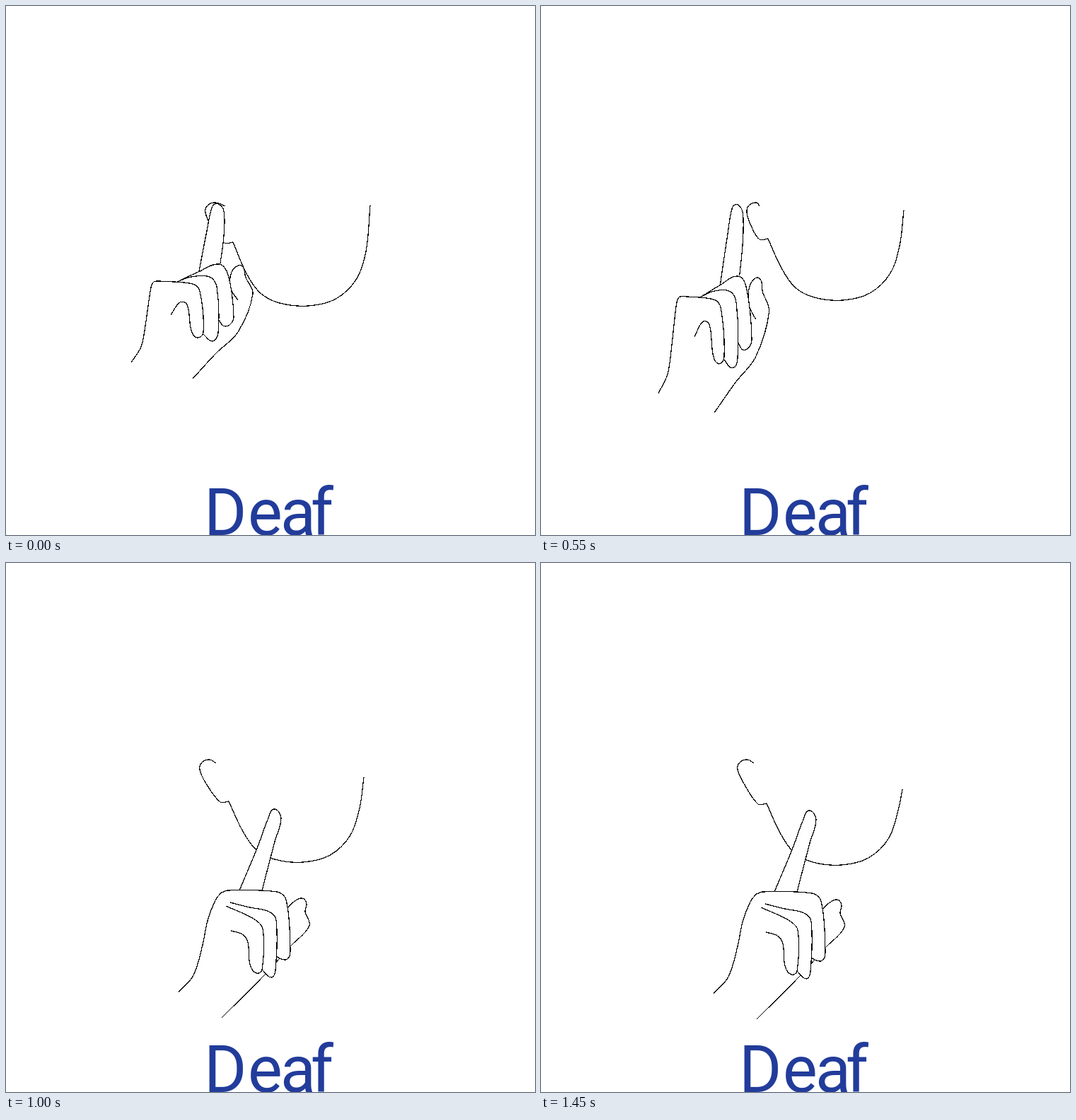
These frames come from a looping animation (748x748 px, 1500 ms). An HTML page:

```html
<!DOCTYPE html>
<html lang="en">
<head>
<meta charset="utf-8">
<title>Deaf</title>
<style>
  html, body { margin: 0; width: 100%; height: 100%; overflow: hidden; background: #fff; }
  svg { display: block; width: 100vw; height: 100vh; }
  path { fill: none; stroke: #000; stroke-width: 1.25; shape-rendering: crispEdges; }
  path.solid { fill: #fff; }
  text { font: 400 92px Roboto, Lato, sans-serif; fill: #223c9b; }
</style>
</head>
<body>
<svg viewBox="0 0 748 748">
  <g id="lines"></g>
  <text x="280 342 388 431" y="748">Deaf</text>
</svg>
<script>
const LOOP = 1500, STEP = 50;

// Hand lines: [shape at the ear, shape at the mouth, filled].
const HAND = {
  thumb: ['328,416 318,400 319,376 333,367 339,384 349,407 328,461 297,491 264,527',
          '398,490 407,481 419,476 425,484 423,495 429,515 402,544 365,585 305,645', true],
  index: ['273,375 284,318 292,283 300,280 308,290 308,325 303,364',
          '330,465 356,403 370,365 379,350 389,363 380,396 362,465', true],
  middle: ['242,390 272,376 301,365 314,380 322,440 316,451 307,452 301,444',
           '303,469 313,465 383,467 396,478 402,550 398,562 389,562 381,557', true],
  ring: ['242,390 262,383 288,383 298,397 300,462 292,474 279,464',
         '317,482 345,489 372,495 382,507 381,578 375,588 362,577', true],
  pinky: ['217,389 264,393 274,403 279,462 270,469 262,459 256,422 246,419 233,437',
          '311,487 350,505 363,519 362,577 354,582 345,570 342,538 334,527 318,522', true],
  arm: ['177,504 191,482 197,452 205,398 209,390 218,389',
        '244,609 265,585 278,542 285,508 296,479 305,467', false]
};

// time, shift x, shift y, scale x, scale y, morph from ear to mouth
const HAND_KEYS = [
  [0, 0, 0, 1, 1, 0],
  [200, -28, -4, 0.97, 1.04, 0],
  [350, -23, -1, 0.95, 1.08, 0],
  [550, -22, 18, 0.91, 1.19, 0],
  [800, -27, -22, 1, 1, 1],
  [1000, 0, -2, 1, 1, 1],
  [1450, 0, 0, 1, 1, 1]
];
const PIVOT = [300, 370];

// time, ear tip x, lobe x, notch x, notch y, chin y, jaw end x, jaw end y
const HEAD_KEYS = [
  [0, 310, 282, 321, 334, 424, 515, 282],
  [350, 311, 296, 319, 333, 419, 514, 309],
  [550, 309, 291, 321, 329, 416, 513, 289],
  [800, 302, 277, 311, 334, 424, 509, 278],
  [1000, 297, 274, 315, 337, 423, 506, 303],
  [1200, 298, 273, 315, 341, 429, 509, 295],
  [1450, 301, 278, 319, 340, 427, 511, 320]
];

// Jaw profile: fraction of the width, height above the chin.
const JAW = [[0.1, 45], [0.2, 18], [0.34, 4], [0.55, 0], [0.75, 10], [0.9, 38], [0.97, 78]];

const mix = (a, b, u) => a + (b - a) * u;

// Monotone cubic through key rows, so nothing overshoots.
function track(keys, t) {
  const last = keys.length - 1;
  const slope = (i, k) => (keys[i + 1][k] - keys[i][k]) / (keys[i + 1][0] - keys[i][0]);
  const tangent = (i, k) => {
    if (i === 0 || i === last) return 0;
    const a = slope(i - 1, k), b = slope(i, k);
    return a * b > 0 ? 2 * a * b / (a + b) : 0;
  };
  let i = 0;
  while (i < last - 1 && t >= keys[i + 1][0]) i++;
  const h = keys[i + 1][0] - keys[i][0], u = (t - keys[i][0]) / h;
  const ease = u * u * (3 - 2 * u);
  return keys[i].map((v, k) => mix(v, keys[i + 1][k], ease)
    + h * u * (1 - u) * ((1 - u) * tangent(i, k) - u * tangent(i + 1, k))).slice(1);
}

// Smooth curve through points; handles follow the neighbours' direction.
function curve(pts) {
  const dirs = pts.map((p, i) => {
    const a = pts[Math.max(0, i - 1)], b = pts[Math.min(pts.length - 1, i + 1)];
    const len = Math.hypot(b[0] - a[0], b[1] - a[1]);
    return [(b[0] - a[0]) / len, (b[1] - a[1]) / len];
  });
  let d = 'M' + pts[0];
  for (let i = 1; i < pts.length; i++) {
    const a = pts[i - 1], b = pts[i];
    const r = Math.hypot(b[0] - a[0], b[1] - a[1]) / 3;
    const c1 = a.map((v, k) => v + dirs[i - 1][k] * r);
    const c2 = b.map((v, k) => v - dirs[i][k] * r);
    d += `C${c1} ${c2} ${b}`;
  }
  return d;
}

function addPath(solid) {
  const el = document.createElementNS('http://www.w3.org/2000/svg', 'path');
  if (solid) el.setAttribute('class', 'solid');
  document.getElementById('lines').append(el);
  return el;
}

const points = s => s.split(' ').map(p => p.split(',').map(Number));
const ear = addPath(), jaw = addPath();
const hand = Object.values(HAND).map(([from, to, solid]) =>
  ({ el: addPath(solid), from: points(from), to: points(to) }));

function drawHead(t) {
  const [tip, lobe, nx, ny, chin, ex, ey] = track(HEAD_KEYS, t);
  ear.setAttribute('d', curve([
    [tip, 283], [lobe + 14, 278], [lobe + 3, 282], [lobe, 292],
    [mix(lobe, nx, 0.22), 312], [nx - 12, ny + 1], [nx, ny]
  ]));
  const profile = JAW.map(([f, up]) => [mix(nx, ex, f), chin - up]);
  jaw.setAttribute('d', curve([[nx, ny], ...profile, [ex, ey]]));
}

function drawHand(t) {
  const [dx, dy, sx, sy, morph] = track(HAND_KEYS, t);
  const shift = [dx, dy], scale = [sx, sy];
  for (const { el, from, to } of hand) {
    el.setAttribute('d', curve(from.map((p, i) => p.map((v, k) =>
      PIVOT[k] + (mix(v, to[i][k], morph) - PIVOT[k]) * scale[k] + shift[k]))));
  }
}

let last = -1;
function tick() {
  const t = Math.floor(performance.now() % LOOP / STEP) * STEP;
  if (t !== last) {
    last = t;
    drawHead(t);
    drawHand(t);
  }
  requestAnimationFrame(tick);
}
tick();
</script>
</body>
</html>
```
